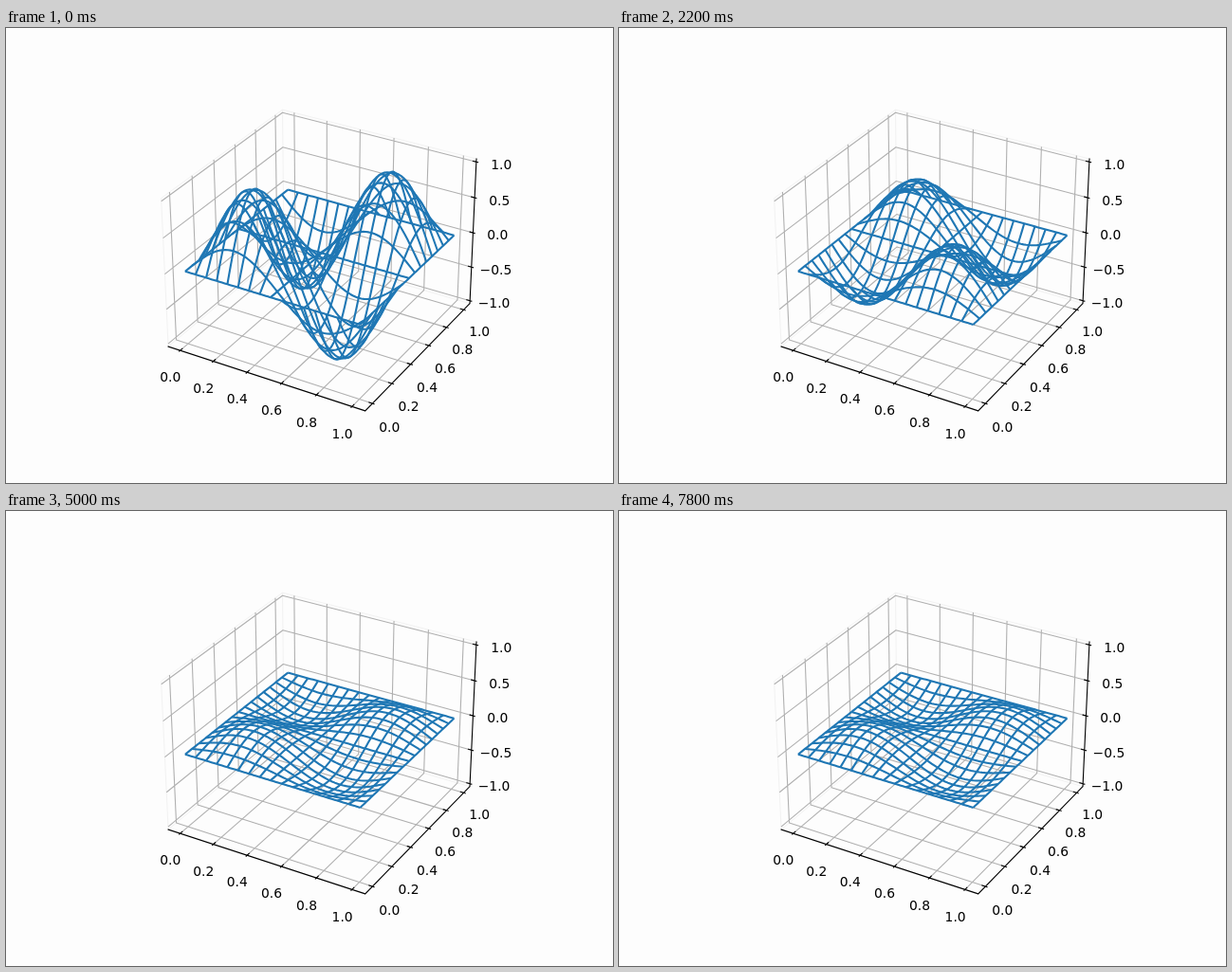
Write an HTML page with a canvas that moves like this. It is 640 px wide and 480 px high and loops after 8 s.

```html
<!DOCTYPE html>
<html lang="en">
<head>
<meta charset="utf-8">
<title>Standing wave on a square membrane</title>
<style>
  html, body { margin: 0; width: 100%; height: 100%; overflow: hidden; background: #fdfdfd; }
  canvas { display: block; }
</style>
</head>
<body>
<canvas id="stage" width="640" height="480"></canvas>
<script>
const ctx = document.getElementById('stage').getContext('2d');
const FRAME_MS = 200, FRAMES = 40, FRAMES_PER_PERIOD = 32;
const POINT = 100 / 72;                  // one typographic point in pixels
const CELLS = 16, SAMPLES = 64;

// Extent of the box, a little larger than the axis limits
const LO = 0.5 - 0.55 * 25 / 24, HI = 1 - LO, TOP = 25 / 24;
const STEP = 1.1 / 12, STEP_Z = 2 / 12;  // base units for ticks and label offsets
const LABEL_GAP = 1.0372;

// Perspective camera: elevation 30°, azimuth -60°, distance 10
const S = Math.sqrt(3) / 2;
function project([x, y, z]) {
  const X = (x - 0.5) / 1.1 * 8 / 7, Y = (y - 0.5) / 1.1 * 8 / 7, Z = z * 3 / 7;
  const scale = 369.6 / 0.185 / (10 - (S / 2 * X - 0.75 * Y + Z / 2));
  return [333 + scale * (S * X + Y / 2),
          237.4 - scale * (-X / 4 + S / 2 * Y + S * Z)];
}

function trace(points) {
  points.forEach((p, i) => ctx[i ? 'lineTo' : 'moveTo'](...project(p)));
}

function stroke(color, width, cap, ...lines) {
  ctx.strokeStyle = color;
  ctx.lineWidth = width;
  ctx.lineCap = cap;
  ctx.lineJoin = 'round';
  ctx.beginPath();
  lines.forEach(trace);
  ctx.stroke();
}

function label(value, position) {
  const [x, y] = project(position);
  ctx.fillText(value.toFixed(1).replace('-', '\u2212'), x, Math.round(y + 10.9));
}

function drawAxes() {
  stroke('#f2f2f2', 1, 'butt',
    [[LO, LO, -TOP], [LO, LO, TOP], [LO, HI, TOP], [HI, HI, TOP]],
    [[LO, LO, -TOP], [LO, HI, -TOP], [HI, HI, -TOP]],
    [[LO, HI, -TOP], [LO, HI, TOP]]);

  const xyTicks = [0, 0.2, 0.4, 0.6, 0.8, 1], zTicks = [-1, -0.5, 0, 0.5, 1];
  stroke('#b0b0b0', 0.8 * POINT, 'butt',
    ...xyTicks.map(v => [[v, LO, -TOP], [v, HI, -TOP], [v, HI, TOP]]),
    ...xyTicks.map(v => [[HI, v, -TOP], [LO, v, -TOP], [LO, v, TOP]]),
    ...zTicks.map(v => [[LO, LO, v], [LO, HI, v], [HI, HI, v]]));

  const outer = 0.1 * STEP, inner = 0.2 * STEP;
  stroke('#000', 0.8 * POINT, 'square',
    [[LO, LO, -TOP], [HI, LO, -TOP]],
    [[HI, LO, -TOP], [HI, HI, -TOP]],
    [[HI, HI, -TOP], [HI, HI, TOP]],
    ...xyTicks.map(v => [[v, LO - outer, -TOP], [v, LO + inner, -TOP]]),
    ...xyTicks.map(v => [[HI + outer, v, -TOP], [HI - inner, v, -TOP]]),
    ...zTicks.map(v => [[HI + outer, HI, v], [HI - inner, HI, v]]));

  const gap = LABEL_GAP * STEP, below = -TOP - LABEL_GAP * STEP_Z;
  ctx.fillStyle = '#000';
  ctx.font = `${10 * POINT}px "DejaVu Sans", sans-serif`;
  ctx.textAlign = 'center';
  for (const v of xyTicks) {
    label(v, [v, LO - gap, below]);
    label(v, [HI + gap, v, below]);
  }
  for (const v of zTicks) label(v, [HI + gap, HI + gap, v]);
}

function drawMembrane(amplitude) {
  const wave = v => Math.sin(2 * Math.PI * v);
  const point = (x, y) => [x, y, amplitude * wave(x) * wave(y)];
  const along = Array.from({ length: SAMPLES + 1 }, (_, i) => i / SAMPLES);
  for (let i = 0; i <= CELLS; i++) {
    stroke('#1f77b4', 1.5 * POINT, 'butt', along.map(s => point(s, i / CELLS)));
  }
  for (let i = 0; i <= CELLS; i++) {
    stroke('#1f77b4', 1.5 * POINT, 'butt', along.map(s => point(i / CELLS, s)));
  }
}

const start = performance.now();
function draw() {
  const step = Math.floor(Math.max(0, performance.now() - start) / FRAME_MS) % FRAMES;
  ctx.fillStyle = '#fdfdfd';
  ctx.fillRect(0, 0, 640, 480);
  drawAxes();
  drawMembrane(Math.cos(2 * Math.PI * step / FRAMES_PER_PERIOD));
  requestAnimationFrame(draw);
}
draw();
</script>
</body>
</html>
```
